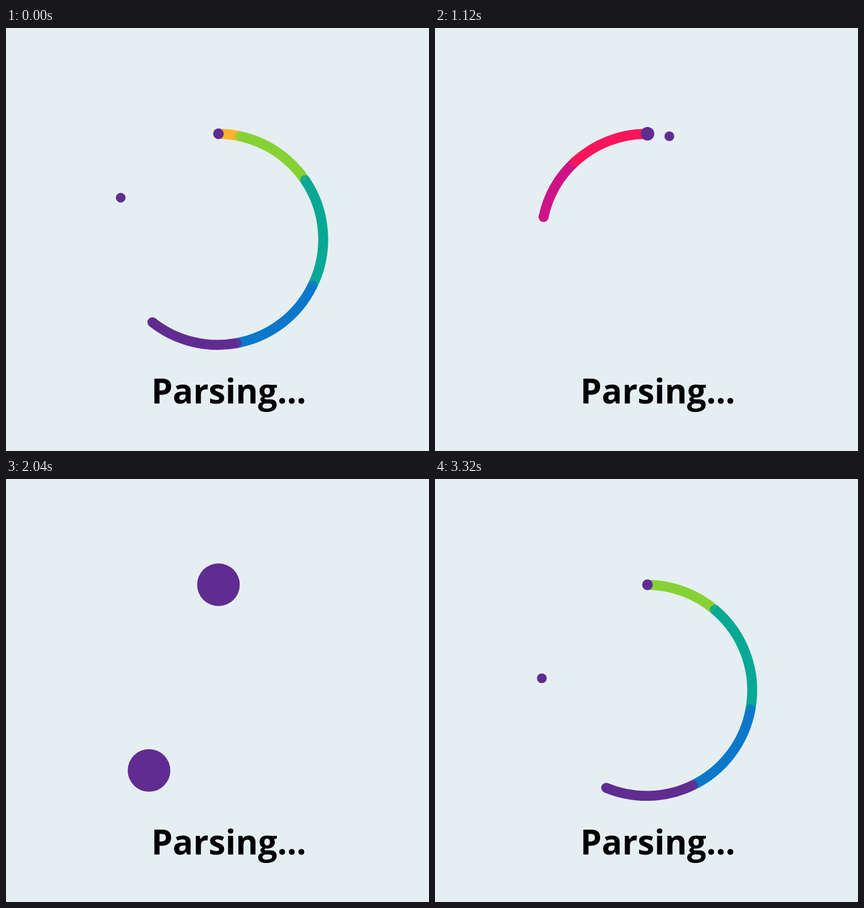
These frames come from a looping animation (748 by 748 pixels, 3360 ms). An HTML page with a canvas:

```html
<!DOCTYPE html>
<html lang="en">
<head>
<meta charset="utf-8">
<title>Parsing</title>
<style>
html, body { margin: 0; width: 100%; height: 100%; overflow: hidden; background: #e5eef1; }
canvas { display: block; }
</style>
</head>
<body>
<canvas id="stage" width="748" height="748"></canvas>
<script>
const ctx = document.getElementById('stage').getContext('2d');

const BG = '#e5eef1', PURPLE = '#612c91';
const CX = 374.3, CY = 373.7, R = 186.6, WIDTH = 17.6;
const STEP = 40, STEPS = 84;
const START = 14;          // steps since the ring left the top dot
const SPEED = 15.65;       // ring degrees per step
const SMALL = 8.6, BIG = 37.7;

const COLORS = [PURPLE, '#0b78cb', '#07a894', '#86d235', '#ffb529', '#fd5524', '#f9155a', '#cf1387'];
// Degrees behind the ring's head where each band begins and ends.
const EDGES = [0, 48.6, 102.2, 162.4, 206, 250, 297.2, 339, 374.2];

// Orbit of the free dot: [step, degrees]
const ORBIT = [[0, 8.6], [2.5, 88], [5, 138.6], [13.5, 284.9], [25, 471.7],
  [42, 732.4], [56, 860.1], [70, 983], [84, 1088.6]];

const clamp = (v, lo, hi) => Math.min(hi, Math.max(lo, v));
const ramp = (s, s0, s1, a, b) => a + (b - a) * clamp((s - s0) / (s1 - s0), 0, 1);
const rad = deg => (deg - 90) * Math.PI / 180;
const point = deg => [CX + R * Math.cos(rad(deg)), CY + R * Math.sin(rad(deg))];

function slope(i) {
  const [x0, y0] = ORBIT[i], [x1, y1] = ORBIT[i + 1];
  return (y1 - y0) / (x1 - x0);
}

function tangent(i) {
  const last = ORBIT.length - 1;
  if (i === 0) return slope(0);
  if (i === last) return slope(last - 1);
  return (slope(i - 1) + slope(i)) / 2;
}

// Cubic Hermite curve through the orbit points
function orbitAngle(s) {
  let i = 0;
  while (i < ORBIT.length - 2 && s > ORBIT[i + 1][0]) i++;
  const [x0, y0] = ORBIT[i], [x1, y1] = ORBIT[i + 1];
  const h = x1 - x0, u = (s - x0) / h, v = 1 - u;
  return y0 * (1 + 2 * u) * v * v + y1 * u * u * (3 - 2 * u)
    + h * u * v * (tangent(i) * v - tangent(i + 1) * u);
}

function disc(x, y, r, color) {
  ctx.fillStyle = color;
  ctx.beginPath();
  ctx.arc(x, y, r, 0, Math.PI * 2);
  ctx.fill();
}

function cap(deg, color, alpha) {
  ctx.globalAlpha = alpha;
  disc(...point(deg), WIDTH / 2, color);
  ctx.globalAlpha = 1;
}

function drawRing(s) {
  const head = SPEED * s - 0.9;
  ctx.lineWidth = WIDTH;
  ctx.lineCap = 'butt';
  for (let i = COLORS.length - 1; i >= 0; i--) {
    const front = head - EDGES[i], back = head - EDGES[i + 1];
    const a = clamp(back, 0, 360), b = clamp(front, 0, 360);
    if (b <= a) continue;
    const isTail = i === COLORS.length - 1;
    if (back > 0) cap(back, COLORS[i], isTail ? 1 : 0.85);
    if (i === 0 && front < 360) cap(front, COLORS[i], 1);
    ctx.strokeStyle = COLORS[i];
    ctx.beginPath();
    ctx.arc(CX, CY, R, rad(a), rad(b));
    ctx.stroke();
  }
}

function topRadius(s) {
  return s < 20 ? ramp(s, 0, 8.5, BIG, 9.4) : ramp(s, 40.9, 52.6, 9.4, BIG);
}

function orbitRadius(s) {
  return s < 20 ? ramp(s, 0, 2.5, BIG, SMALL) : ramp(s, 42, 54, SMALL, BIG);
}

function drawLabel() {
  const text = 'Parsing...';
  ctx.font = '700 60px "Open Sans", "Noto Sans", sans-serif';
  ctx.fillStyle = '#000';
  ctx.fillText(text, 262 + ctx.measureText(text).actualBoundingBoxLeft, 664);
}

function draw(ms) {
  const s = (Math.floor(ms / STEP) + START) % STEPS;
  ctx.fillStyle = BG;
  ctx.fillRect(0, 0, 748, 748);
  drawRing(s);
  const [x, y] = point(orbitAngle(s)), r = orbitRadius(s);
  disc(x, y, r + 16.4, BG);
  disc(375.7, 187, topRadius(s), PURPLE);
  disc(x, y, r, PURPLE);
  drawLabel();
}

function tick() {
  draw(performance.now());
  requestAnimationFrame(tick);
}
tick();
</script>
</body>
</html>
```
